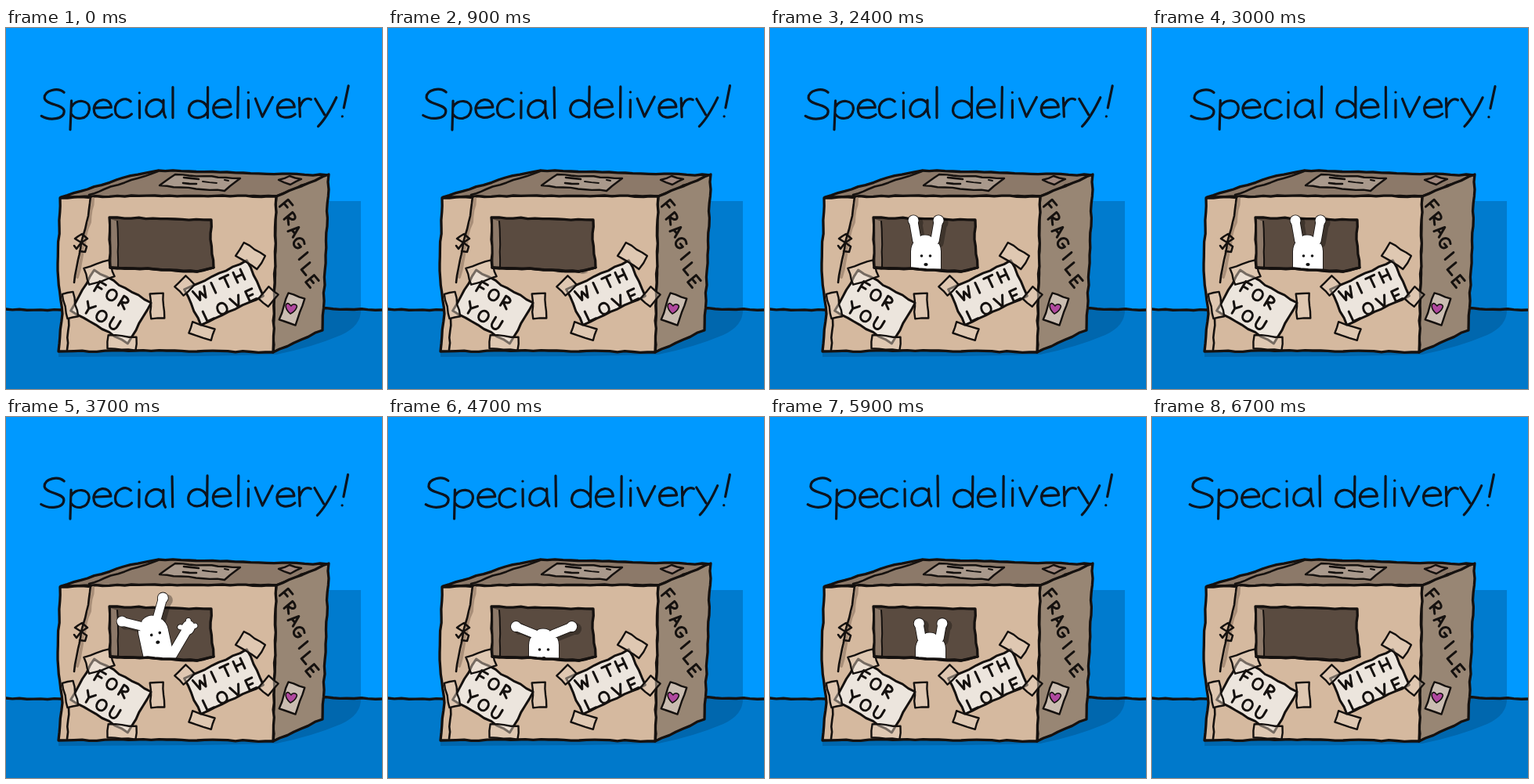
These frames come from a looping animation (480x461 px, 6.8 s). An HTML page:

```html
<!DOCTYPE html>
<html lang="en">
<head>
<meta charset="utf-8">
<title>Special delivery!</title>
<style>
  html, body { margin: 0; width: 100%; height: 100%; overflow: hidden; background: #0099ff; }
  svg { display: block; width: 100%; height: 100%; }
  path { stroke-linecap: round; stroke-linejoin: round; }
</style>
</head>
<body>
<svg viewBox="0 0 480 461" role="img" aria-label="Special delivery! A box marked FOR YOU, WITH LOVE, FRAGILE">
  <defs>
    <clipPath id="sill"><path d="M0 0H480V306H264L244 311L190 308H0Z"/></clipPath>
  </defs>
  <g id="room"></g>
  <g id="shade" opacity=".3" clip-path="url(#sill)" transform="translate(5 3)"></g>
  <g id="body" clip-path="url(#sill)"></g>
  <g id="ears"></g>
  <g id="face" fill="#111" clip-path="url(#sill)"></g>
  <g id="front"></g>
  <g id="title" fill="none" stroke="#0b1420" stroke-width="3.2"></g>
</svg>
<script>
const LOOP = 6800, STEP = 100;
const INK = '#15110f', PAPER = '#ece5dd', TAPE = 'rgba(236,218,200,.45)';
const $ = id => document.getElementById(id);
const rad = deg => deg * Math.PI / 180;
let layer = $('room');

function add(parent, tag, attrs) {
  const el = document.createElementNS('http://www.w3.org/2000/svg', tag);
  for (const k in attrs) el.setAttribute(k, attrs[k]);
  return parent.appendChild(el);
}

const noise = n => {
  const s = Math.sin(n * 127.1 + 11.7) * 43758.5453;
  return (s - Math.floor(s)) * 2 - 1;
};

// Hand-drawn line: each edge is cut into short pieces that wobble a little.
let seed = 1;
function rough(pts, closed) {
  const out = [];
  const edges = closed ? pts.length : pts.length - 1;
  for (let i = 0; i < edges; i++) {
    const a = pts[i], b = pts[(i + 1) % pts.length];
    const n = Math.ceil(Math.hypot(b[0] - a[0], b[1] - a[1]) / 10);
    for (let j = 0; j < n; j++)
      out.push([0, 1].map(k => a[k] + (b[k] - a[k]) * j / n + noise(seed++) * (j ? 0.8 : 0)));
  }
  if (!closed) out.push(pts[pts.length - 1]);
  return 'M' + out.map(p => p.map(v => v.toFixed(1)).join(' ')).join('L') + (closed ? 'Z' : '');
}
const points = text => text.split(' ').map(p => p.split(',').map(Number));
const flat = (d, fill) => add(layer, 'path', { d, fill });
const outline = (pts, fill, width) =>
  add(layer, 'path', { d: rough(pts, true), fill, stroke: INK, 'stroke-width': width });
const shape = (text, fill, width = 3.3) => outline(points(text), fill, width);
const line = (text, width = 2.6, stroke = INK) =>
  add(layer, 'path', { d: rough(points(text), false), fill: 'none', stroke, 'stroke-width': width });

function card(x, y, w, h, angle, fill = TAPE, width = 2.4) {
  const c = Math.cos(rad(angle)), s = Math.sin(rad(angle));
  const corners = [[-1, -1], [1, -1], [1, 1], [-1, 1]].map(([i, j]) => {
    const dx = i * w / 2, dy = j * h / 2;
    return [x + dx * c - dy * s, y + dx * s + dy * c];
  });
  outline(corners, fill, width);
}

const CAPS = {
  F: 'M-4 7L-4 -7L5 -7M-4 0L3 0',
  O: 'M0 -7C-8 -7 -8 7 0 7C8 7 8 -7 0 -7Z',
  R: 'M-4 7L-4 -7C7 -8 7 1 -4 1L5 7',
  Y: 'M-6 -7L0 0L6 -7M0 0L0 7',
  U: 'M-5 -7L-5 1C-5 9 5 9 5 1L5 -7',
  W: 'M-8 -7L-4 7L0 -3L4 7L8 -7',
  I: 'M0 -7L0 7',
  T: 'M-6 -7L6 -7M0 -7L0 7',
  H: 'M-5 -7L-5 7M5 -7L5 7M-5 0L5 0',
  L: 'M-4 -7L-4 7L5 7',
  V: 'M-6 -7L0 7L6 -7',
  E: 'M5 -7L-4 -7L-4 7L5 7M-4 0L3 0',
  A: 'M-5 7L0 -7L5 7M-3 2L3 2',
  G: 'M5 -5C-2 -10 -7 -4 -6 1C-5 9 5 8 5 1L0 1'
};
function write(word, cx, cy, gap, angle, turn = angle) {
  [...word].forEach((ch, i) => {
    const d = (i - (word.length - 1) / 2) * gap;
    const x = cx + d * Math.cos(rad(angle)), y = cy + d * Math.sin(rad(angle));
    add(layer, 'path', {
      d: CAPS[ch], fill: 'none', stroke: INK, 'stroke-width': 3,
      transform: `translate(${x} ${y}) rotate(${turn})`
    });
  });
}

function drawRoom() {
  flat('M0 0H480V461H0Z', '#0099ff');
  flat('M0 359H480V461H0Z', '#0079cb');
  flat('M400 221H453V360H400Z', '#007bce');
  flat('M400 359H453Q454 380 428 392Q390 408 345 417L250 419L67 420V405Z', '#0067ae');
  line('0,359 70,360', 3.4);
  line('400,358 480,360', 3.4);
}

function drawBox() {
  shape('70,216 104,206 150,191 194,182 411,188 345,215', '#8c7969');
  shape('345,215 412,187 408,290 404,386 341,414', '#988674');
  shape('69,217 160,214 345,215 341,414 205,412 67,413 72,365 66,310', '#d5b99f');
  line('106,213 125,206 160,194 194,183');

  shape('196,201 216,187 299,192 279,208', '#a9998c', 2.4);
  line('227,191 246,193');
  line('226,198 243,199');
  line('251,196 269,198', 1.8);
  line('279,194 284,195', 2);
  shape('348,194 362,189 377,193 363,200', '#a2897f', 2.4);
}

function drawString() {
  line('111,218 107,248 101,266 97,290 91,318', 4, '#a98f79');
  line('108,215 105,240 96,274 92,296 87,325');
  line('80,371 78,411');
  line('96,274 88,269 97,263 104,269 96,274 90,282 87,278');
  line('96,274 103,279 101,286 94,285');
}

function drawLabels() {
  card(134, 356, 84, 60, 30, PAPER, 3);
  card(119, 312, 34, 22, -18);
  card(193, 355, 17, 32, -3);
  card(82, 354, 14, 32, -12);
  card(148, 402, 36, 17, 4);
  write('FOR', 135, 341, 18, 31);
  write('YOU', 122, 368, 19, 31);

  card(278, 338, 88, 50, -25, PAPER, 3);
  card(312, 291, 32, 20, 32);
  card(335, 343, 20, 16, -50);
  card(228, 329, 20, 16, -45);
  card(250, 387, 30, 15, 18);
  write('WITH', 273, 328, 18, -25);
  write('LOVE', 285, 354, 20, -25);

  write('FRAGILE', 374, 275, 17, 71, 50);
  card(365, 359, 22, 36, 19, '#cabdb1');
  add(layer, 'path', {
    d: 'M363 365C354 357 357 350 361 352L364 355C366 351 373 353 371 357Q369 362 363 365Z',
    fill: '#b0489f', stroke: INK, 'stroke-width': 1.6
  });
}

function drawWindow() {
  shape('132,242 262,245 261,270 265,306 244,311 190,308 133,306', '#5a4b40');
  flat('M134 244L142 247L143 306L135 304Z', '#8d7969');
  line('142,247 143,306', 2);
  layer = $('front');
  line('133,306 190,308 244,311 265,306', 3.3);
}

// Each glyph: advance width and strokes, with the baseline at zero.
const GLYPHS = {
  S: [32, 'M29 -33C21 -40 4 -36 4 -26C5 -17 29 -18 29 -9C29 2 10 3 0 -3'],
  p: [25, 'M1 -22L0 15M1 -14C6 -25 25 -24 24 -11C22 3 6 3 1 -5'],
  e: [23, 'M0 -12L22 -13C21 -27 1 -25 0 -11C0 3 16 2 23 -4'],
  c: [21, 'M20 -20C14 -27 0 -22 0 -10C0 3 15 2 21 -4'],
  i: [8, 'M4 -22L4 0M4 -32l.1 0'],
  a: [25, 'M22 -18C13 -28 0 -20 0 -9C1 4 18 1 22 -12M22 -22C22 -10 22 -4 25 0'],
  l: [8, 'M4 -39L4 0'],
  d: [26, 'M24 -39L24 0M24 -12C19 -26 0 -24 0 -9C1 3 20 3 24 -8'],
  v: [23, 'M0 -23L9 0L22 -25'],
  r: [15, 'M0 -24L1 0M1 -13C4 -21 9 -25 15 -22'],
  y: [26, 'M0 -23L12 -3M27 -25C19 -8 12 4 4 12'],
  '!': [8, 'M12 -39L6 -11M4 0l.1 0']
};
const letters = [];
let pen = 45;
for (const ch of 'Special delivery!') {
  if (ch === ' ') { pen += 11; continue; }
  const [width, d] = GLYPHS[ch];
  letters.push({ x: pen, el: add($('title'), 'path', { d }) });
  pen += width + 5;
}

// The lettering cycles through four slightly different drawings.
function drawTitle(take) {
  const shift = [0, 0, 5, 3][take];
  letters.forEach(({ x, el }, i) => {
    const n = take * 40 + i, far = i / letters.length;
    const dx = shift * (1 - far) + noise(n) * 0.6;
    const y = 115 - 2 * far + noise(n + 300) * 0.6;
    el.setAttribute('transform', `translate(${x + dx} ${y}) rotate(${noise(n + 600)})`);
  });
}

const ramp = (t, from, to) => {
  const u = Math.min(1, Math.max(0, (t - from) / (to - from)));
  return u * u * (3 - 2 * u);
};
const pulse = (t, on, off, inTime = 300, outTime = 300) =>
  ramp(t, on, on + inTime) - ramp(t, off, off + outTime);

// Pops up left, right, then in the middle; waves, flops its ears, bows and leaves.
function poseAt(t) {
  const up = pulse(t, 100, 600) + pulse(t, 900, 1400) + pulse(t, 1800, 5950);
  const wave = pulse(t, 3300, 4200);
  const flop = pulse(t, 4300, 5100);
  const bow = pulse(t, 5400, 5800, 300, 100);
  const turned = t >= 5700;
  const place = t < 900 ? 174 : t < 1800 ? 230 : 199;
  return {
    wave, bow, turned,
    x: place - 11 * wave + (turned ? 6 : 0),
    y: 281 + 70 * (1 - up) - 11 * wave + 6 * flop + (turned ? 11 : 0),
    tilt: -30 * wave,
    spread: 10 + 36 * wave + 58 * flop + 150 * bow,
    ear: (turned ? 19 : 26) + 24 * bow
  };
}

// Limbs are thick strokes: a dark pass first, then a white pass on top.
function limbs(group, parts, passes = [[INK, 1.6], ['#fff', 0]]) {
  group.replaceChildren();
  for (const [stroke, extra] of passes)
    for (const [d, w] of parts)
      add(group, 'path', { d, fill: 'none', stroke, 'stroke-width': w + extra });
}

function drawDog(t) {
  const { x, y, tilt, spread, ear, wave, bow, turned } = poseAt(t);
  const skull = `M${x - 1} ${y}L${x + 1} ${y + 2}`;
  const ears = [-1, 1].flatMap(side => {
    const root = rad(tilt + side * 50 - 90), aim = rad(tilt + side * spread - 90);
    const x0 = x + 15 * Math.cos(root), y0 = y + 15 * Math.sin(root);
    const x1 = x0 + ear * Math.cos(aim), y1 = y0 + ear * Math.sin(aim);
    return [[`M${x0} ${y0}L${x1} ${y1}`, 10.5], [`M${x1} ${y1}l.1 0`, 13]];
  });
  const body = [[skull, 33], [`M${x} ${y + 4}L${x + 11 * wave} ${y + 55}`, 38]];
  if (wave > 0.3) {
    const hx = 232 + 4 * Math.sin((t - 3700) / 200 * Math.PI), hy = 308 - 38 * wave;
    body.push([`M209 309L${hx} ${hy}`, 12], [`M${hx} ${hy}l1 -2`, 16]);
    for (const a of [-170, -85, -20])
      body.push([`M${hx} ${hy}l${10 * Math.cos(rad(a))} ${10 * Math.sin(rad(a))}`, 6]);
  }
  limbs($('body'), body);
  limbs($('ears'), ears);
  limbs($('shade'), ears, [['#000', 2]]);
  add($('ears'), 'path', { d: skull, stroke: '#fff', 'stroke-width': 32 });
  $('ears').setAttribute('clip-path', bow > 0.3 ? 'none' : 'url(#sill)');

  const face = $('face');
  face.replaceChildren();
  if (turned) return;
  face.setAttribute('transform', '');
  const look = add(face, 'g', { transform: `translate(${x + 3 * wave} ${y + 10 - 3 * wave}) rotate(${tilt / 2})` });
  for (const side of [-1, 1]) add(look, 'circle', { cx: 5.5 * side, cy: 0, r: 1.8 });
  add(look, 'ellipse', { cx: 0, cy: 11, rx: 2.6, ry: 2.1 });
}

drawRoom();
drawBox();
drawString();
drawLabels();
drawWindow();

const start = performance.now();
function tick() {
  const frame = Math.floor(((performance.now() - start) % LOOP) / STEP);
  drawTitle(frame % 4);
  drawDog(frame * STEP);
  requestAnimationFrame(tick);
}
tick();
</script>
</body>
</html>
```
